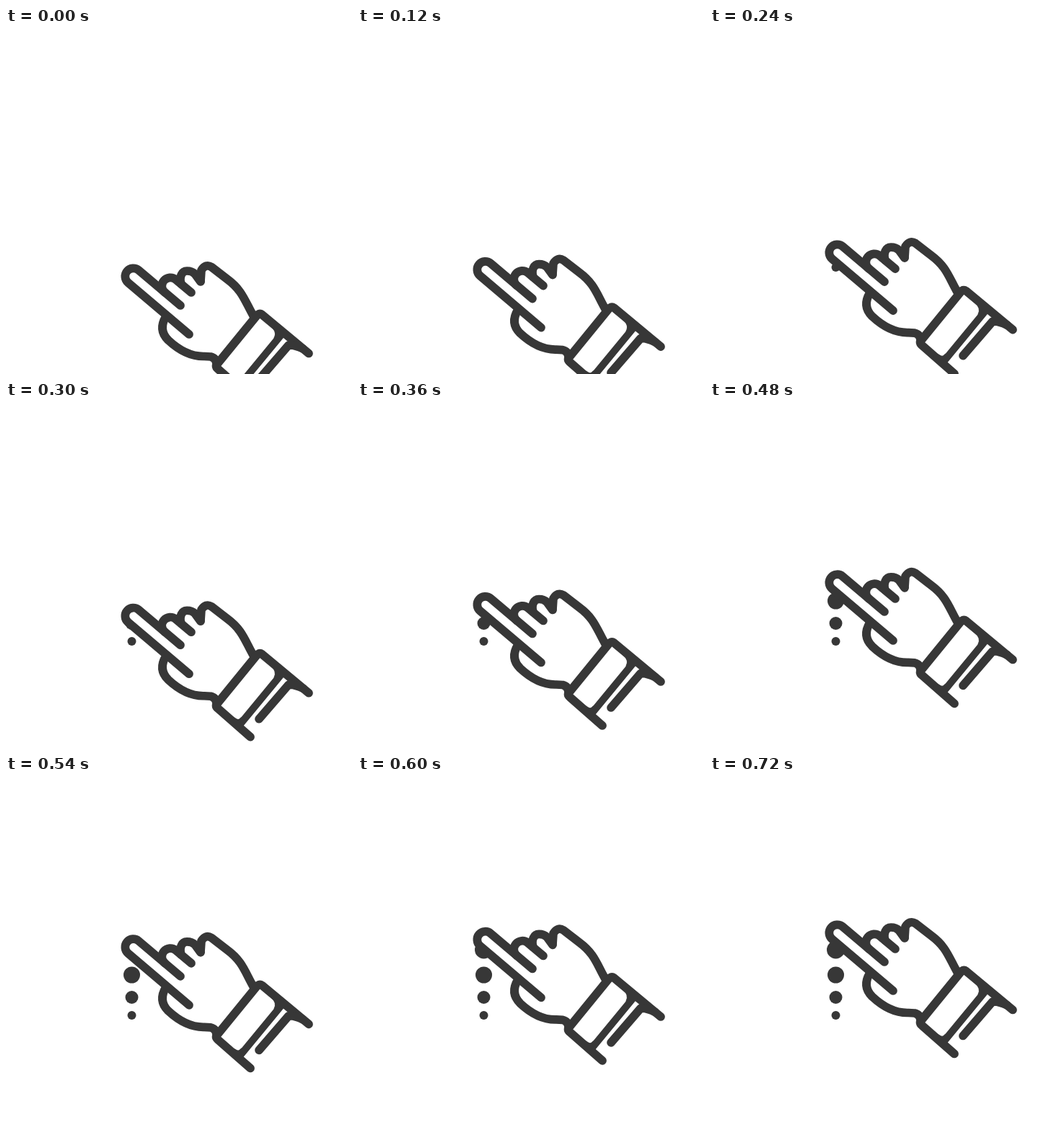
Recreate the animation shown at these times as an HTML page. Size 480 by 480 pixels, loop 1080 ms.

```html
<!DOCTYPE html>
<html lang="en">
<head>
<meta charset="utf-8">
<style>
html, body { margin: 0; height: 100%; overflow: hidden; background: #fff; }
svg { display: block; width: 100vw; height: 100vh; }
</style>
</head>
<body>
<svg viewBox="0 0 480 480">
  <clipPath id="below"><rect id="shown" width="480" height="480"/></clipPath>
  <g fill="#373737" clip-path="url(#below)">
    <circle cx="174.5" cy="332" r="6"/>
    <circle cx="174.5" cy="307" r="9"/>
    <circle cx="174.5" cy="276" r="11.5"/>
    <circle cx="174.5" cy="241" r="12.5"/>
  </g>
  <g id="hand" fill="none" stroke="#373737" stroke-width="11.7" stroke-linecap="round" stroke-linejoin="round">
    <!-- index finger -->
    <path fill="#fff" d="M242 258L184 209A11.2 11.2 0 0 0 169.300 226.200L254 298"/>
    <!-- folded fingers and back of the hand -->
    <path d="M220.500 240A11.700 11.700 0 0 1 235.500 222L257 240"/>
    <path d="M243 228C240 218 244 210 251 210Q258 210 262 214L270 225"/>
    <path d="M270 224L271 209Q277 199.500 285 204.500L307 221.500C328 237 331 251 343.500 273"/>
    <!-- thumb -->
    <path d="M222 273C214 286 216 297 225 306C240 320 256 329 275 328.500L284 329Q292 331 292 340"/>
    <!-- cuff and sleeve -->
    <path d="M420 324.500L355 270.500Q351 267.500 347 273L294 338Q289 342 294 346L339 385.500"/>
    <path stroke-width="10" d="M384 296L323 370M371 284Q382 294 376 305M329 362Q323 369 315 363"/>
    <path d="M412 318Q399 312 392 313L351 360.500"/>
  </g>
</svg>
<script>
const LOOP = 1080, RISE = 720, STEP = 30, DROP = 127, TIP = 218;
const hand = document.getElementById('hand');
const shown = document.getElementById('shown');
const start = performance.now();

function draw(now) {
  const ms = Math.max(0, now - start) % LOOP;
  const t = Math.min(1, Math.floor(ms / STEP) * STEP / RISE);
  const y = DROP * (1 - t * t * (3 - 2 * t));
  hand.setAttribute('transform', `translate(0 ${y})`);
  shown.setAttribute('y', TIP + y); // dots appear only below the fingertip
  requestAnimationFrame(draw);
}
draw(start);
</script>
</body>
</html>
```
